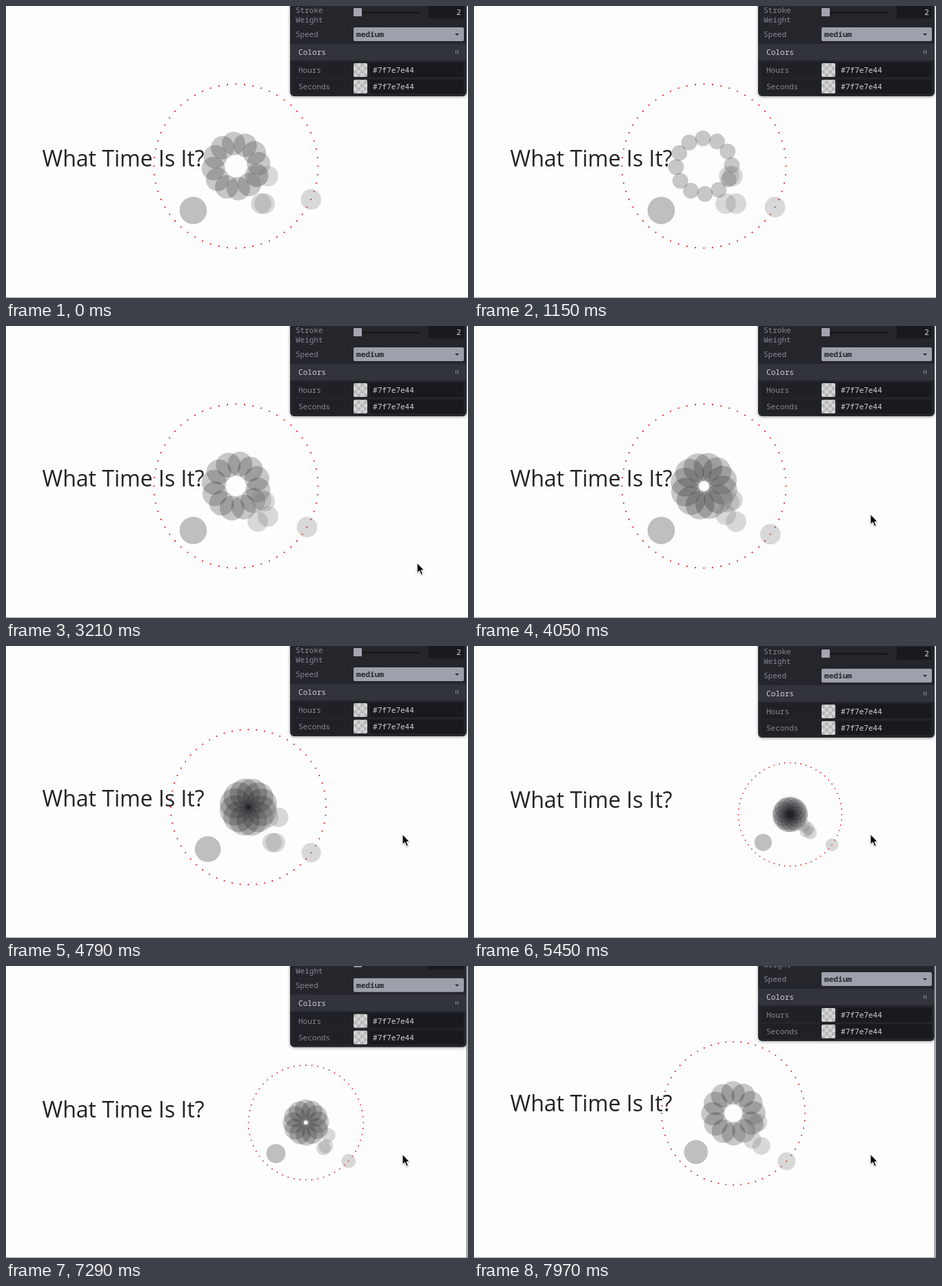
An HTML page for the animation above (7.99 s loop, 670 by 424 pixels).

```html
<!DOCTYPE html>
<html lang="en">
<head>
<meta charset="utf-8">
<title>What Time Is It?</title>
<style>
  html, body { margin: 0; width: 100%; height: 100%; overflow: hidden; background: #fdfdfd; }
  svg { display: block; width: 670px; height: 424px; }
  .title { font: 32px "Open Sans", sans-serif; fill: #222226; }
  .panel text { font: 11px "Noto Sans Mono", monospace; fill: #888a92; }
  .panel text.lit { font-size: 11.1px; fill: #d2d3d8; }
  .panel text.pick { font-size: 11.1px; font-weight: 700; fill: #24262c; }
  #cursor { filter: drop-shadow(0 1px 1px rgba(0, 0, 0, .3)); }
</style>
</head>
<body>
<svg viewBox="0 0 670 424" xmlns="http://www.w3.org/2000/svg">
  <defs>
    <pattern id="check" width="10" height="10" patternUnits="userSpaceOnUse" x="504" y="83">
      <path d="M0 0h10v10H0z" fill="#d4d4d4"/>
      <path d="M0 0h5v5H0zM5 5h5v5H5z" fill="#b8b8b8"/>
    </pattern>
    <filter id="glow" x="-10%" y="-10%" width="120%" height="125%">
      <feGaussianBlur stdDeviation="2"/>
    </filter>
  </defs>
  <rect width="670" height="424" fill="#fdfdfd"/>
  <g id="page">
    <text class="title" x="52.5" y="233">What Time Is It?</text>
  </g>
  <g id="clock"></g>
  <g id="panel" class="panel">
    <rect x="412" y="-60" width="256" height="192" rx="6" fill="#404044" opacity=".5" filter="url(#glow)"/>
    <rect x="412" y="-60" width="256" height="191" rx="6" fill="#24262c"/>
    <text x="420" y="10">Stroke</text>
    <text x="420" y="24">Weight</text>
    <path d="M516 9.5H601" stroke="#121317" stroke-width="2"/>
    <rect x="504" y="3" width="12" height="12" rx="1" fill="#a2a5ae"/>
    <rect x="613" y="-1" width="51" height="19" fill="#191a1f"/>
    <text class="lit" x="660" y="13" text-anchor="end">2</text>
    <text x="420" y="45">Speed</text>
    <rect x="504" y="31" width="160" height="20" rx="2" fill="#9da1ab"/>
    <text class="pick" x="508" y="45">medium</text>
    <path d="M651 40h6l-3 3z" fill="#24262c"/>
    <rect x="412" y="55" width="256" height="24" fill="#31343a"/>
    <text class="lit" x="424" y="71">Colors</text>
    <path d="M652.5 64.5v5M655.5 64.5v5" stroke="#96989e"/>
    <rect x="416" y="81" width="248" height="23" fill="#1f2126"/>
    <rect x="416" y="106" width="248" height="22" fill="#1f2126"/>
    <rect x="528" y="83" width="136" height="20" fill="#191a1f"/>
    <rect x="528" y="107" width="136" height="20" fill="#191a1f"/>
    <text x="424" y="97">Hours</text>
    <text x="424" y="121">Seconds</text>
    <rect x="504" y="83" width="20" height="20" rx="2" fill="url(#check)"/>
    <rect x="504" y="107" width="20" height="20" rx="2" fill="url(#check)"/>
    <text class="lit" x="532" y="97">#7f7e7e44</text>
    <text class="lit" x="532" y="121">#7f7e7e44</text>
  </g>
  <path d="M0 423.5H670" stroke="#a4a4a6"/>
  <path id="edge" d="M668.5 0V424" stroke="#8a8a8c" stroke-width="2"/>
  <path id="cursor" d="M0 0V14.5L3.4 11.5L5.9 17.2L8.3 16.2L5.9 10.6H10.2Z"
        fill="#000" stroke="#fff" stroke-width="1"/>
</svg>
<script>
const LOOP = 7990, TAU = Math.PI * 2, FULL = 119;
const $ = id => document.getElementById(id);
const clock = $('clock');

function balls(count, fill, alpha) {
  return Array.from({ length: count }, () => {
    const c = document.createElementNS('http://www.w3.org/2000/svg', 'circle');
    c.setAttribute('fill', fill);
    c.setAttribute('fill-opacity', alpha);
    clock.appendChild(c);
    return c;
  });
}
const place = (c, x, y, r) => {
  c.setAttribute('cx', x.toFixed(2));
  c.setAttribute('cy', y.toFixed(2));
  c.setAttribute('r', r.toFixed(2));
};

const ticks = balls(60, '#e01818', 1);
const petals = balls(12, '#1c1c20', .24);
const [hour] = balls(1, '#6a6a6c', .42);
const wave = balls(4, '#7f7e7e', .29);
const [second] = balls(1, '#7f7e7e', .29);

// Smooth curve through [step, value] points, flat outside them.
function curve(points, n) {
  const last = points.length - 1;
  if (n <= points[0][0]) return points[0][1];
  if (n >= points[last][0]) return points[last][1];
  let i = 0;
  while (n > points[i + 1][0]) i++;
  const slope = k => k <= 0 || k >= last ? 0
    : (points[k + 1][1] - points[k - 1][1]) / (points[k + 1][0] - points[k - 1][0]);
  const [x0, y0] = points[i], [x1, y1] = points[i + 1];
  const w = x1 - x0, u = (n - x0) / w, v = 1 - u;
  return v * v * ((1 + 2 * u) * y0 + u * w * slope(i))
       + u * u * ((1 + 2 * v) * y1 - v * w * slope(i + 1));
}

const size = [[76, 119], [90, 108], [100, 75], [112, 61], [127, 58], [154, 104]];
const scroll = [[90, 0], [100, 2], [112, 1], [127, -2], [154, -22]];
const orbit = [[-17, .277], [9, .34], [34, .303], [70, .235], [100, .14], [127, .14], [154, .285]];
const petal = [[-17, .143], [9, .096], [34, .126], [70, .176], [100, .207], [127, .21], [154, .164]];
const spin = [[-17, -6], [9, -2], [34, 7.5], [70, 12], [154, 29]];
const pointerX = [[46, 606], [62, 575]];
const pointerY = [[46, 424], [54, 318], [64, 273.5]];

// The picture advances three steps every 140 ms, held for 100, 20 and 20 ms.
function stepAt(t) {
  const k = Math.floor((t - 730) / 140), rest = t - 730 - 140 * k;
  return 3 * k + (rest < 100 ? 0 : rest < 120 ? 1 : 2);
}

function draw(t) {
  const n = stepAt(t);
  const R = curve(size, n), dy = curve(scroll, n);
  const cx = 333.5 + 2.84 * (FULL - R);
  const cy = 232.5 + .229 * (FULL - R) + dy;
  const polar = (c, turn, dist, r) =>
    place(c, cx + dist * Math.sin(turn * TAU), cy - dist * Math.cos(turn * TAU), r);

  for (const id of ['page', 'panel']) $(id).setAttribute('transform', `translate(0 ${dy.toFixed(2)})`);

  ticks.forEach((c, i) => polar(c, i / 60, R, .55 + .5 * R / FULL));

  const turn = curve(spin, n) / 360;
  const dist = R * curve(orbit, n), r = R * curve(petal, n);
  petals.forEach((c, i) => polar(c, i / 12 + turn, dist, r));

  place(hour, cx - .521 * R, cy + .541 * R, R / 6);

  // Each column bobs slightly faster than the one to its left.
  wave.forEach((c, i) => {
    const sign = i % 3 ? 1 : -1;
    const swing = .168 * sign * Math.cos(TAU * (n + 17) * (.0955 + .0004 * i));
    place(c, cx + (.265 + .042 * i) * R, cy + (.29 + swing) * R, R / 8);
  });

  const secs = 19 + Math.floor((t + 2200) / 2800);
  polar(second, secs / 60, R, R / 8);

  $('edge').style.display = t >= 6240 ? '' : 'none';
  $('cursor').style.display = n >= 46 ? '' : 'none';
  $('cursor').setAttribute('transform',
    `translate(${curve(pointerX, n).toFixed(1)} ${curve(pointerY, n).toFixed(1)})`);
}

const start = performance.now();
function tick() {
  draw((performance.now() - start) % LOOP);
  requestAnimationFrame(tick);
}
tick();
</script>
</body>
</html>
```
